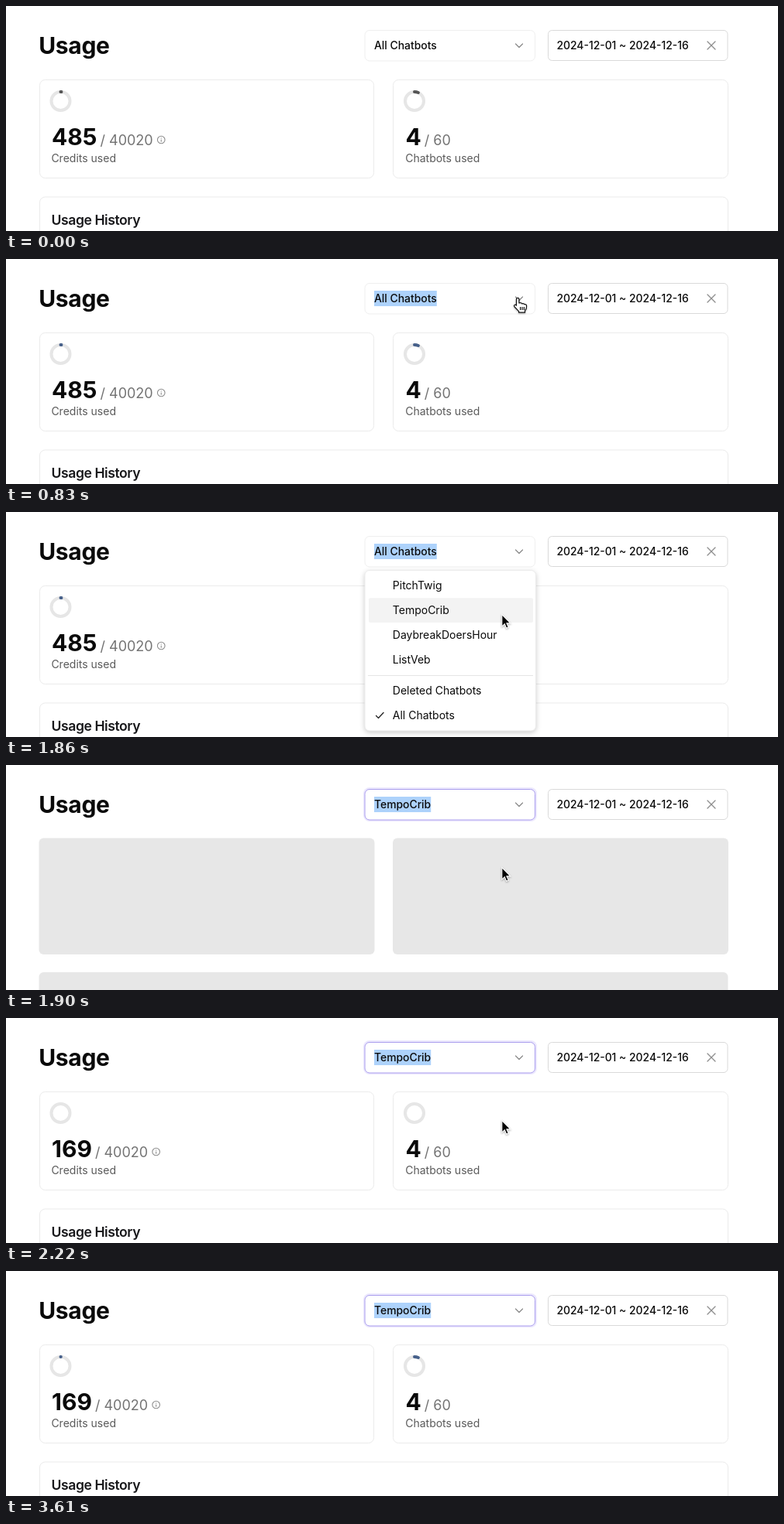
An HTML page that plays this animation: 996 by 291 pixels, repeating every 3710 ms.

```html
<!DOCTYPE html>
<html lang="en">
<head>
<meta charset="utf-8">
<title>Usage</title>
<style>
  html, body { margin: 0; width: 100%; height: 100%; overflow: hidden; background: #fff; }
  svg { display: block; width: 996px; height: 291px; }
  text { font: 400 14px Inter, sans-serif; font-optical-sizing: none; fill: #0a0a0a; white-space: pre; }
  .big { font-size: 30px; font-weight: 700; }
  .medium { font-size: 13.9px; font-weight: 500; }
  .total { font-size: 18px; font-weight: 400; fill: #737373; }
  .caption { fill: #5a5a5a; }
  .heading { font-size: 17.6px; font-weight: 600; letter-spacing: -.025em; fill: #18181b; }
  .box { fill: #fff; stroke: #ebebeb; }
  .line { fill: none; stroke: #8c8c8c; stroke-width: 1.3; stroke-linecap: round; stroke-linejoin: round; }
  .track { fill: none; stroke: #e6e6e6; stroke-width: 4; }
  .arc { fill: none; stroke-width: 4; stroke-linecap: round; }
  #menu-box { filter: drop-shadow(0 2px 3px #0003); }
  #cursor { filter: drop-shadow(0 1px 1px #0005); }
</style>
</head>
<body>
<svg viewBox="0 0 996 291">
  <text class="big" x="42.2" y="62" letter-spacing="-.01em">Usage</text>

  <rect id="halo" x="461" y="29" width="224" height="44" rx="8" fill="#ebe7fd"/>
  <rect id="select" class="box" x="463" y="31.5" width="219.5" height="39.5" rx="6"/>
  <rect id="selection" x="475" y="41" height="20" fill="#add2fb"/>
  <text id="choice" class="medium" x="475" y="56"></text>
  <path class="line" d="M657.5 49l4.5 4.5 4.5-4.5"/>

  <rect class="box" x="699.5" y="31.5" width="231.5" height="39" rx="5" style="stroke:#d9d9d9"/>
  <text class="medium" x="710.5" y="56">2024-12-01 ~ 2024-12-16</text>
  <path class="line" d="M905 46l10 10m0-10l-10 10"/>

  <g id="cards">
    <rect class="box" x="43.5" y="95.5" width="431" height="127" rx="7"/>
    <rect class="box" x="499.5" y="95.5" width="432" height="127" rx="7"/>
    <rect class="box" x="43.5" y="247" width="888" height="80" rx="7"/>
    <circle class="track" cx="70.5" cy="123" r="12"/>
    <circle class="track" cx="527" cy="123" r="12"/>
    <path class="arc" id="credit-arc"/>
    <path class="arc" id="bot-arc"/>
    <text id="credits" class="big" x="59" y="179.5"><tspan id="used"></tspan><tspan class="total" dx="4">/ 40020</tspan></text>
    <g id="info" class="line" style="stroke-width:1.1">
      <circle r="4.8"/><path d="M0 0V2.3M0-2.2v.1"/>
    </g>
    <text class="caption" x="58.4" y="202">Credits used</text>
    <text class="big" x="515.4" y="179.5">4<tspan class="total" dx="4">/ 60</tspan></text>
    <text class="caption" x="515.2" y="202">Chatbots used</text>
    <text class="heading" x="58.5" y="283">Usage History</text>
  </g>

  <g id="skeleton" fill="#e7e7e7">
    <rect x="42.5" y="94.5" width="433" height="150.5" rx="6"/>
    <rect x="499" y="94.5" width="433" height="150.5" rx="6"/>
    <rect x="42.5" y="268" width="889" height="80" rx="6"/>
  </g>

  <g id="menu">
    <rect id="menu-box" class="box" x="463" y="75.5" width="220.5" height="207.5" rx="6"/>
    <rect id="highlight" x="468" width="212" height="31.7" rx="2" fill="#f3f3f3"/>
    <path d="M467 211.5H680" stroke="#e5e5e5"/>
    <path class="line" d="M477.5 263.5l3 3 6.5-7" style="stroke:#222"/>
  </g>

  <g id="cursor">
    <path id="arrow" d="M0 0V15.5l3.5-3.3 2.3 5.4 2.6-1.1-2.3-5.2h4.9z" fill="#000" stroke="#fff" stroke-width="1.1"/>
    <g id="hand" fill="#fff" stroke="#111" stroke-width="1.2" stroke-linejoin="round">
      <path d="M-1.7 1.6a1.7 1.7 0 0 1 3.4 0V6.5q3-1 3.6.8 2.8-.8 3.4.9 2.7-.4 2.7 2.2 0 4-2.1 6v2.3H1.4v-1.6L-4 11.5q-1.5-2 .3-2.8 1.3-.4 2 1z"/>
      <path d="M3.4 11.5v4M5.8 11.5v4M8.2 11.5v4"/>
    </g>
  </g>
</svg>
<script>
const LOOP = 3710, SELECT = 830, OPEN = 860, PICK = 1900, LOADED = 2220, FILL = 2280, FILLED = 2560;
const ITEM_HEIGHT = 31.8;
const ITEMS = [
  ["PitchTwig", 95.3], ["TempoCrib", 127.1], ["DaybreakDoersHour", 158.9],
  ["ListVeb", 190.7], ["Deleted Chatbots", 231.3], ["All Chatbots", 263.1],
];
// Pointer path: time, x, y
const PATH = [
  [160, 668, 300], [680, 660.2, 50.5], [1020, 660.2, 50.5], [1330, 643.8, 110.6],
  [1580, 643.8, 110.6], [1860, 639.8, 132.6], [2890, 639.8, 132.6], [3430, 650, 300],
];

const $ = id => document.getElementById(id);
const set = (id, attrs) => Object.entries(attrs).forEach(([k, v]) => $(id).setAttribute(k, v));
const show = (id, on) => set(id, { visibility: on ? "visible" : "hidden" });
const clamp = v => Math.min(1, Math.max(0, v));
const ease = v => v * v * (3 - 2 * v);

for (const [label, y] of ITEMS) {
  const text = document.createElementNS("http://www.w3.org/2000/svg", "text");
  text.textContent = label;
  text.setAttribute("x", 498.8);
  text.setAttribute("y", y + 5);
  $("menu").append(text);
}

function pointerAt(t) {
  const next = PATH.findIndex(p => p[0] > t);
  if (next < 1) return PATH[next ? PATH.length - 1 : 0].slice(1);
  const [t0, x0, y0] = PATH[next - 1], [t1, x1, y1] = PATH[next];
  const k = ease((t - t0) / (t1 - t0));
  return [x0 + (x1 - x0) * k, y0 + (y1 - y0) * k];
}

function drawArc(id, cx, share, color) {
  const angle = share * 2 * Math.PI;
  set(id, {
    d: share ? `M${cx} 111A12 12 0 0 1 ${cx + 12 * Math.sin(angle)} ${123 - 12 * Math.cos(angle)}` : "",
    stroke: color,
  });
}

function draw(t) {
  const picked = t >= PICK, open = t >= OPEN && !picked, selected = t >= SELECT;
  const loading = picked && t < LOADED;
  const [x, y] = pointerAt(t);

  $("choice").textContent = ITEMS[picked ? 1 : 5][0];
  set("selection", { width: $("choice").getComputedTextLength() });
  show("selection", selected);
  show("halo", picked);
  $("select").style.stroke = picked ? "#aa9eee" : "#efefef";

  show("cards", !loading);
  show("skeleton", loading);
  const used = picked ? 169 : 485;
  $("used").textContent = used;
  const infoX = 59 + $("credits").getComputedTextLength() + 14.5;
  set("info", { transform: `translate(${infoX} 173)` });
  const fill = picked ? ease(clamp((t - FILL) / (FILLED - FILL))) : 1;
  const color = selected ? "#46608a" : "#555";
  drawArc("credit-arc", 70.5, fill * used / 40020, color);
  drawArc("bot-arc", 527, fill * 4 / 60, color);

  show("menu", open);
  const hovered = y < 79 ? 5 : Math.min(3, Math.floor((y - 79.4) / ITEM_HEIGHT));
  set("highlight", { y: ITEMS[Math.max(0, hovered)][1] - ITEM_HEIGHT / 2 });

  const onSelect = y < 71;
  set("cursor", { transform: `translate(${x} ${y})` });
  show("arrow", !onSelect);
  show("hand", onSelect);
}

function tick() {
  draw(performance.now() % LOOP);
  requestAnimationFrame(tick);
}
tick();
</script>
</body>
</html>
```
